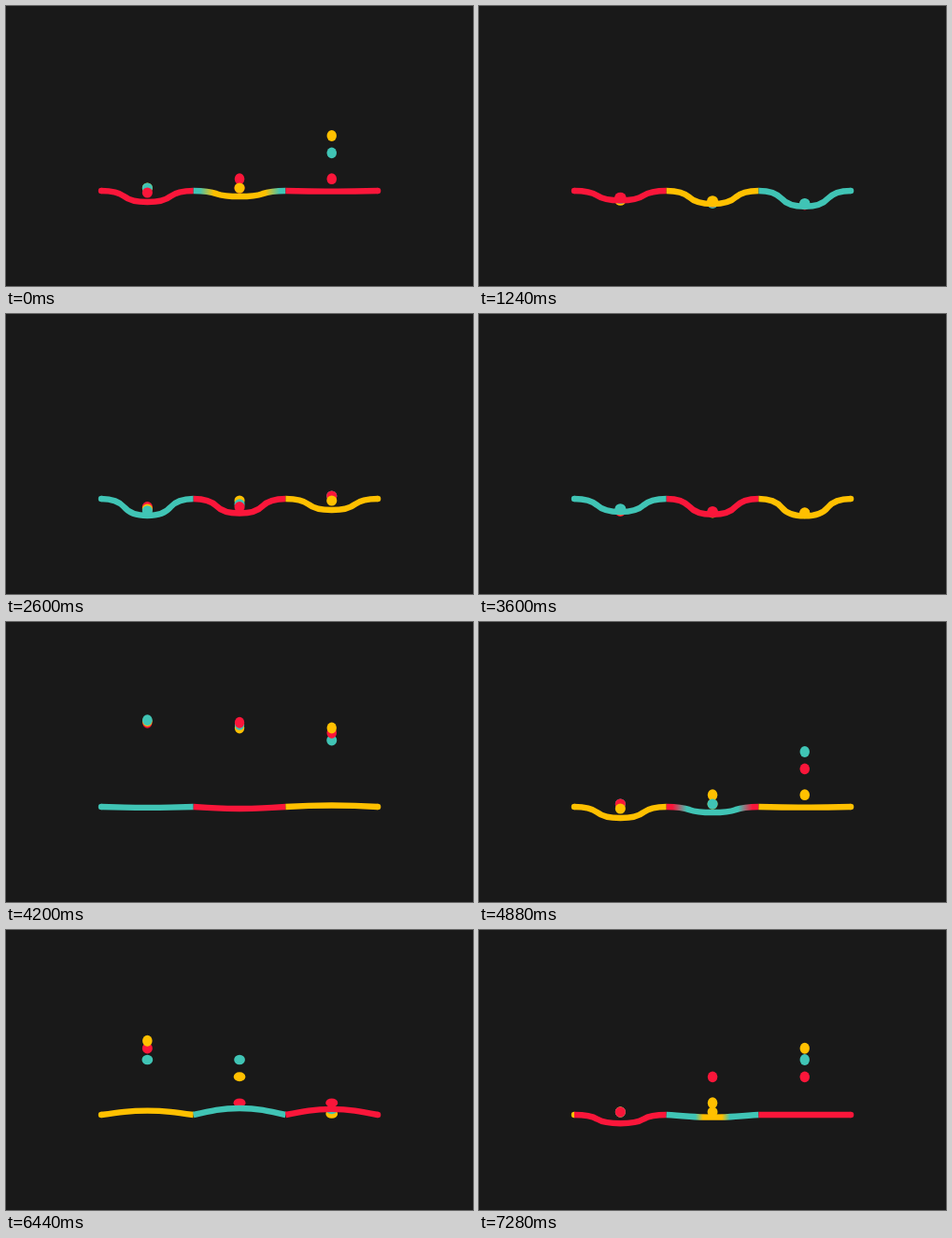
These frames come from a looping animation (500x300 px, 7.32 s). An HTML page with a canvas:

```html
<!DOCTYPE html>
<html lang="en">
<head>
<meta charset="utf-8">
<title>Trampoline loader</title>
<style>
  html, body { margin: 0; width: 100%; height: 100%; overflow: hidden; background: #191919; }
  canvas { display: block; }
</style>
</head>
<body>
<canvas id="stage" width="500" height="300"></canvas>
<script>
const ctx = document.getElementById('stage').getContext('2d');
const COLORS = ['#fa163a', '#40c4b5', '#ffc000'];
const LOOP = 7320, CYCLE = LOOP / 3, STEP = 40;
const LANDING = -150, APEX = 1840;
const LEFT = 102, BASE = 198, WIDTH = 98.7, HALF = WIDTH / 2;
const FIRST_COLOR = [0, 2, 1];

// Depth of the middle of a trampoline: sink, slow release, recoil.
const DEPTH = [
  [-150, .8], [-120, 2.6], [-80, 6], [0, 12], [150, 17.7], [300, 19.8],
  [450, 20.4], [700, 20.1], [900, 19.2], [1000, 18.4], [1080, 16.9],
  [1160, 14], [1240, 10.3], [1320, 2.5], [1400, -6.1], [1450, -7.5],
  [1480, -7], [1560, -4.4], [1640, 1.3], [1680, 2], [1720, 1.6],
  [1800, .2], [1900, -.2], [2000, 0], [2240, 0], [2290, .8]
];
// Vertical radius of a ball; the horizontal one keeps the area constant.
const STRETCH = [
  [-150, 5.9], [-100, 5.6], [1000, 5.6], [1400, 4.8], [1560, 5.9],
  [1700, 6], [1840, 5.6], [2050, 6], [2290, 5.9]
];

const clamp = v => Math.max(0, Math.min(1, v));
const mix = (a, b, k) => a + (b - a) * k;

// Smooth curve through the keys.
function curve(keys, t) {
  let i = 0;
  while (i < keys.length - 2 && t > keys[i + 1][0]) i++;
  const slope = j => {
    const a = keys[Math.max(0, j - 1)], b = keys[Math.min(keys.length - 1, j + 1)];
    return (b[1] - a[1]) / (b[0] - a[0]);
  };
  const [t0, v0] = keys[i], [t1, v1] = keys[i + 1];
  const span = t1 - t0, u = clamp((t - t0) / span), w = 1 - u;
  return v0 * (1 + 2 * u) * w * w + v1 * (3 - 2 * u) * u * u
    + span * u * w * (slope(i) * w - slope(i + 1) * u);
}

// Time within the bounce, and the number of landings so far.
function phase(time, delay) {
  const t = time - delay - LANDING;
  const count = Math.floor(t / CYCLE);
  return { t: t - count * CYCLE + LANDING, count };
}

const colorOf = n => COLORS[(n + 9) % 3];

function ballY(t) {
  const air = 103.2 + 82 * 1.515 ** ((Math.abs(t - APEX) - 440) / 40);
  let rest = BASE + curve(DEPTH, t) - 3.5 - 6.5 * Math.exp(-t / 120);
  if (t < 500) rest = Math.max(195, rest);
  return Math.min(air, rest);
}

function drawBall(time, col, n) {
  const { t, count } = phase(time, col * 80 + n * 40);
  const ry = curve(STRETCH, t);
  ctx.fillStyle = colorOf(count + n + FIRST_COLOR[col]);
  ctx.beginPath();
  ctx.ellipse(LEFT + WIDTH * (col + .5), ballY(t), 31 / ry, ry, 0, 0, 7);
  ctx.fill();
}

function drawLine(time, col) {
  const { t, count } = phase(time, col * 80);
  const x0 = LEFT + col * WIDTH, d = curve(DEPTH, t);
  const k = clamp((d - 1.5) / 5);

  // Half of the outline, blended from a plain arc to an S shape.
  const half = [
    [0, 0], [mix(8, 12, k), mix(.25, 0, k)], [mix(16, 20, k), mix(.5, .2, k)],
    [HALF / 2, mix(.72, .5, k)],
    [mix(32, 29, k), mix(.9, .8, k)], [mix(41, 38, k), 1], [HALF, 1]
  ];
  const mirrored = half.slice(0, 6).reverse().map(([x, y]) => [WIDTH - x, y]);
  const p = [...half, ...mirrored].map(([x, y]) => [x0 + x, BASE + y * d]);

  // The new colour spreads from the middle.
  const age = t - LANDING;
  const inner = clamp(age * (.3 + .0014 * age) / 50) / 2;
  const outer = clamp(age * .62 / 50) / 2;
  const before = colorOf(count - 1 + FIRST_COLOR[col]);
  const after = colorOf(count + FIRST_COLOR[col]);
  let paint = after;
  if (inner < .5) {
    paint = ctx.createLinearGradient(x0, 0, x0 + WIDTH, 0);
    paint.addColorStop(.5 - outer, before);
    paint.addColorStop(.5 - inner, after);
    paint.addColorStop(.5 + inner, after);
    paint.addColorStop(.5 + outer, before);
  }

  ctx.strokeStyle = ctx.fillStyle = paint;
  ctx.lineWidth = 6.4;
  ctx.beginPath();
  ctx.moveTo(...p[0]);
  for (let i = 1; i < p.length; i += 3) ctx.bezierCurveTo(...p[i], ...p[i + 1], ...p[i + 2]);
  ctx.stroke();

  if (col !== 1) {
    ctx.beginPath();
    ctx.arc(col ? x0 + WIDTH : x0, BASE, 3.2, 0, 7);
    ctx.fill();
  }
}

function draw(now) {
  const time = Math.floor(now % LOOP / STEP) * STEP;
  ctx.fillStyle = '#191919';
  ctx.fillRect(0, 0, 500, 300);
  for (let col = 0; col < 3; col++) {
    for (let n = 2; n >= 0; n--) drawBall(time, col, n);
  }
  for (let col = 0; col < 3; col++) drawLine(time, col);
}

const start = performance.now();
function tick() {
  draw(performance.now() - start);
  requestAnimationFrame(tick);
}
tick();
</script>
</body>
</html>
```
